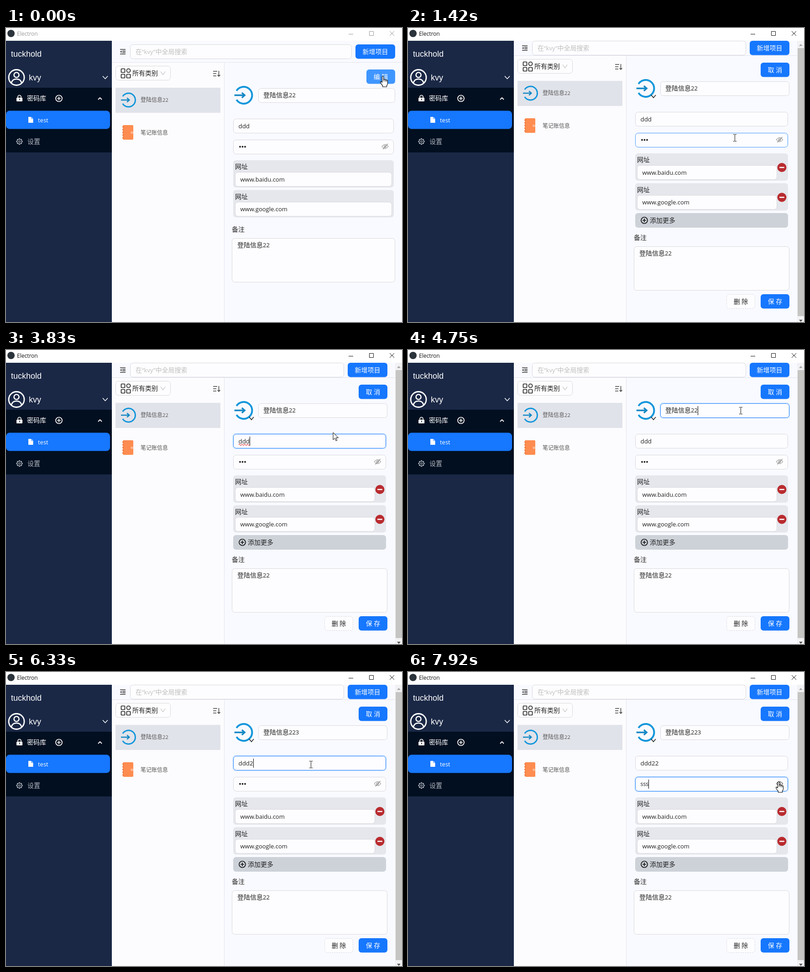
An HTML page for the animation above (8 s loop, 868 by 645 pixels).

```html
<!DOCTYPE html>
<html lang="zh">
<head>
<meta charset="utf-8">
<style>
html, body { margin: 0; width: 100%; height: 100%; overflow: hidden; background: #fff; }
svg { display: block; width: 868px; height: 645px; }
text { font-family: "Open Sans", "Noto Sans CJK SC", "Noto Sans CJK", sans-serif; white-space: pre; }
.ui { font-family: "Liberation Sans", Arial, sans-serif; }
</style>
</head>
<body>
<svg id="stage" viewBox="0 0 868 645"></svg>
<script>
const LOOP = 8000, STEP = 1000 / 12;
const BLUE = '#1677ff', HOVER = '#4096ff', INK = '#222';

// ---- timeline, in ms ----
const ACTIVE = 583, EDIT = 667, REVEAL = 7833;
const mouse = [[0, 826, 105], [167, 828, 101], [833, 828, 101], [1417, 716, 241], [1833, 711, 207],
  [3500, 711, 207], [4333, 729, 133], [5583, 729, 133], [6083, 668, 203], [6583, 668, 203],
  [7083, 672, 245], [7250, 672, 245], [7833, 812, 240]];
const focusKeys = [[0, ''], [2583, 'name'], [4583, 'title'], [6083, 'name'], [7083, 'pass']];
const titleKeys = [[0, '登陆信息22', 635], [5417, '登陆信息223', 643]];
const nameKeys = [[0, 'ddd', 534], [6333, 'ddd2', 542], [6500, 'ddd22', 550]];
const passKeys = [[0, '', 527], [REVEAL, 'sss', 527]];
const caretResets = [[2500], [4650], [5410], [6075], [6325], [6490], [7075], [7825]];

const at = (keys, t) => keys.filter(k => k[0] <= t + 1).pop() || keys[0];
const inside = (p, x, y, x2, y2) => p.x >= x && p.x <= x2 && p.y >= y && p.y <= y2;

function pointer(t) {
  const i = mouse.findIndex(k => k[0] > t + 1);
  const b = i < 0 ? mouse[mouse.length - 1] : mouse[i], a = mouse[i < 0 ? mouse.length - 1 : i - 1];
  const p = b[0] > a[0] ? (t - a[0]) / (b[0] - a[0]) : 0, e = p * p * (3 - 2 * p);
  return { x: Math.round(a[1] + (b[1] - a[1]) * e), y: Math.round(a[2] + (b[2] - a[2]) * e) };
}

// ---- drawing helpers ----
const rect = (x, y, x2, y2, fill, r = 0, more = '') =>
  `<rect x="${x}" y="${y}" width="${x2 - x}" height="${y2 - y}" rx="${r}" fill="${fill}" ${more}/>`;
const path = (d, stroke, w = 1, fill = 'none') =>
  `<path d="${d}" stroke="${stroke}" stroke-width="${w}" fill="${fill}"/>`;
const dot = (x, y, r, fill, stroke = 'none', w = 0) =>
  `<circle cx="${x}" cy="${y}" r="${r}" fill="${fill}" stroke="${stroke}" stroke-width="${w}"/>`;
const shift = (x, y, body) => `<g transform="translate(${x} ${y})">${body}</g>`;

// Latin runs sit a little smaller than the Chinese ones
function text(str, x, mid, fill = INK, size = 14, more = '') {
  const runs = str.replace(/[^\u2e80-\uffff]+/g, s => `<tspan font-size="${size * 13 / 14}">${s}</tspan>`);
  return `<text x="${x}" y="${mid + size * .34}" font-size="${size}" fill="${fill}" ${more}>${runs}</text>`;
}
const box = (x, y, x2, y2, stroke = '#d9d9de', more = '') =>
  rect(x + .5, y + .5, x2 - .5, y2 - .5, '#fdfdff', 6, `stroke="${stroke}" ${more}`);
const button = (label, x, y, x2, fill = BLUE) =>
  rect(x, y, x2, y + 31.5, fill, 6) + text(label, (x + x2) / 2, y + 16, '#fff', 14, 'text-anchor="middle"');
const chevron = (x, y, w, h, color, sw) => path(`M${x - w} ${y - h}L${x} ${y + h}L${x + w} ${y - h}`, color, sw);

// open ring with an arrow running into it
const loginIcon = (x, y, r, w) => shift(x, y,
  path(`M${-r * .85} ${-r * .53}A${r} ${r} 0 1 1 ${-r * .85} ${r * .53}`, '#1296db', w) +
  path(`M${-r * 1.1} 0H${r * .1}M${-r * .22} ${-r * .3}L${r * .12} 0L${-r * .22} ${r * .3}`, '#1488c4', w * .85));

const plusIcon = (x, y, color) => dot(x, y, 7, 'none', color, 1.7) +
  path(`M${x - 4} ${y}H${x + 4}M${x} ${y - 4}V${y + 4}`, color, 1.7);

function eyeIcon(x, y, open, color) {
  return shift(x, y, path('M-7 0Q0 -9 7 0Q0 9 -7 0Z', color, 1.1) + dot(0, 0, 2.3, 'none', color, 1.1) +
    (open ? '' : path('M-5 6L6 -6', color, 1.2)));
}

function titleBar(active) {
  const c = active ? '#111' : '#999';
  return rect(0, 0, 868, 28, '#fff') + dot(11, 12, 8, '#2b333b') +
    `<text x="24" y="17" font-size="12" fill="${c}">Electron</text>` +
    path('M751 13.5H761M796.5 7.5H805.5V16.5H796.5ZM841 7L851 17M851 7L841 17', c);
}

function sidebar() {
  const gear = Array.from({ length: 8 }, (_, i) =>
    `<path d="M0 -5V-7" transform="rotate(${i * 45})" stroke="#b4bac2" stroke-width="2.6"/>`).join('');
  return rect(0, 28, 232, 645, '#1a2846') + rect(0, 131, 232, 273, '#020f20') +
    '<text class="ui" x="11" y="63" font-size="18" fill="#fff">tuckhold</text>' +
    dot(23, 108.5, 17, 'none', '#fff', 2.8) + dot(23, 103, 5.5, 'none', '#fff', 2.6) +
    path('M12 120Q14 112 23 112T34 120', '#fff', 2.6) +
    '<text class="ui" x="50" y="115" font-size="18" fill="#fff">kvy</text>' +
    chevron(217.5, 108.5, 5.5, 3, '#fff', 1.5) +
    rect(23, 153, 36, 161, '#fff', 1) + path('M26 153V151A3.5 3.5 0 0 1 33 151V153', '#fff', 1.7) +
    rect(29, 155, 30.5, 158.5, '#020f20') +
    text('密码库', 46, 154.5, '#fff', 14, 'font-weight="500"') + plusIcon(116, 154.5, '#fff') +
    chevron(206, 155, 4, -2, '#fff', 1.8) +
    rect(0, 181.5, 228, 221.5, BLUE, 8) +
    path('M49 195H55.5L59.5 199V208H49Z', 'none', 0, '#fff') + path('M55.5 195V199H59.5', BLUE, .8) +
    text('test', 70, 202, '#fff') +
    shift(29.5, 249, gear + dot(0, 0, 5.2, 'none', '#b4bac2', 1.3) + dot(0, 0, 2, 'none', '#b4bac2', 1.2)) +
    text('设置', 47, 249, '#b4bac2');
}

function header(edit) {
  const y = edit ? 28 : 36, m = y + 16, x2 = edit ? 836 : 853, line = edit ? 60.5 : 75.5;
  return path(`M232 ${line}H${edit ? 853 : 868}`, '#e2e3ee') +
    path(`M250 ${m - 5}H262M255 ${m - 1.5}H262M255 ${m + 1.5}H262M250 ${m + 5}H262`, '#333', 1.3) +
    path(`M253.5 ${m - 2.5}V${m + 2.5}L250 ${m}Z`, 'none', 0, '#333') +
    box(272, y, x2 - 95, y + 32) + text('在“kvy”中全局搜索', 284, m, '#bfbfbf') +
    button('新增项目', x2 - 87, y, x2);
}

function list() {
  return box(240, 83, 361, 115) +
    [[252, 89, 1], [264, 89, 4], [252, 101, 1], [264, 101, 1]].map(([x, y, r]) =>
      rect(x + .5, y + .5, x + 8.5, y + 8.5, 'none', r, 'stroke="#222" stroke-width="1.7"')).join('') +
    text('所有类别', 277, 99, INK) + chevron(344, 99, 5, 3.5, '#bbb', 1.1) +
    path('M454 95H463M454 100H461M454 105H461M466.5 94V106M463.5 103L466.5 106L469.5 103', '#444', 1.5) +
    rect(240, 131, 470, 186, '#e1e3ea') + loginIcon(268.5, 158, 15, 3) +
    text('登陆信息22', 295, 158, '#555', 12) +
    rect(256, 213, 279, 245, '#ff8c50', 2) + path('M255 217H258M255 223H258M255 229H258M255 235H258M255 241H258', '#e5743c', 2) +
    rect(273, 227, 279, 232, '#ffb68f', 2) + text('笔记账信息', 295, 229.5, '#555', 12);
}

// An input that reacts to hover and focus
function field(id, s, x, y, x2, body, caretX) {
  const focused = s.focus === id, hover = s.edit && inside(s.p, x, y, x2, y + 32);
  const glow = focused ? Math.min(1, (s.t - s.focusAt + STEP) / 250) : 0;
  return (glow ? rect(x - 1, y - 1, x2 + 1, y + 33, 'none', 7, `stroke="#0591ff" stroke-width="2" opacity="${.12 * glow}"`) : '') +
    box(x, y, x2, y + 32, focused ? BLUE : hover ? HOVER : undefined) + body +
    (focused && s.caret ? rect(caretX, y + 6, caretX + 1, y + 26, '#000') : '');
}

function site(url, y, edit, right) {
  return rect(498, y, right, y + 60, '#e5e7ec', 6) + text('网址', 502, y + 14.5) +
    box(502, y + 26, edit ? 809 : 846, y + 58) + text(url, 513.5, y + 42) +
    (edit ? dot(819.5, y + 31, 10, '#b92b2f') + rect(814, y + 29.7, 825, y + 32.3, '#fff', 1) : '');
}

function detail(s) {
  const { edit, t } = s, dy = edit ? -15 : 0, R = edit ? 836 : 853, right = R - 3;
  const [, title, titleX] = at(titleKeys, t), [, name, nameX] = at(nameKeys, t), [, pass, passX] = at(passKeys, t);
  const by = 91 + dy, overButton = inside(s.p, R - 63, by, R, by + 32);
  const eyeX = R - 21.5, overEye = s.edit && inside(s.p, eyeX - 8, 237, eyeX + 8, 253);
  const wave = edit ? .2 * Math.pow(Math.max(0, 1 - (t - EDIT) / 1600), 5) : 0;
  const squiggle = t > 2580 && t < 4580
    ? path('M510 208' + 'q1.5 -3 3 0t3 0'.repeat(4), '#e03030', 1.1) : '';
  const dots = [513, 518.5, 524].map(x => dot(x, 260.5 + dy, 1.9, INK)).join('');
  const noteY = edit ? 479 : 461;
  return (wave > .002 ? rect(R - 66, by - 3, R + 3, by + 35, 'none', 9, `stroke="${BLUE}" stroke-width="6" opacity="${wave}"`) : '') +
    button(edit ? '取 消' : '编 辑', R - 63, by, R, overButton ? HOVER : BLUE) +
    loginIcon(521, 147.5 + dy, 18.5, 4) +
    (edit ? chevron(538, 150, 5, 3, '#222', 1.5) : '') +
    field('title', s, 553, 132 + dy, R, text(title, 564, 147.5 + dy), titleX) +
    field('name', s, 498, 199 + dy, right, text(name, 509.5, 215 + dy, INK, 14.4) + squiggle, nameX) +
    field('pass', s, 498, 245 + dy, right, (pass ? text(pass, 509.5, 260.5 + dy, INK, 13.4) : dots) +
      eyeIcon(eyeX + (edit ? 0 : -.5), 260 + dy, pass, overEye ? '#333' : '#8c8c8c'), passX) +
    site('www.baidu.com', 290 + dy, edit, right) + site('www.google.com', 355.5 + dy, edit, right) +
    (edit ? rect(498, 406, right, 438, '#cdd2d9', 6) + plusIcon(518, 422, '#111') + text('添加更多', 530, 422) : '') +
    text('备注', 495, noteY - 18.5) + box(495, noteY, R, noteY + 97) + text('登陆信息22', 507, noteY + 15.5) +
    (edit ? box(698, 584, 761, 616, '#d9d9de', 'stroke-dasharray="3 2"') +
      text('删 除', 729.5, 600, INK, 14, 'text-anchor="middle"') + button('保 存', 773, 584, 836) : '');
}

const scrollbar = () => rect(853, 28, 868, 645, '#f2f2f4') + rect(854, 44, 868, 632, '#c5c5c4') +
  path('M857 39.5H865L861 35Z', 'none', 0, '#a5a5a5') + path('M857 640H865L861 644.5Z', 'none', 0, '#505050');

function cursor({ p, edit }) {
  const R = edit ? 836 : 853, by = edit ? 76 : 91;
  const hand = inside(p, R - 63, by, R, by + 32) || edit && inside(p, 806, 237, 823, 253);
  const beam = edit && (inside(p, 553, 117, 836, 149) || inside(p, 498, 184, 833, 216) || inside(p, 498, 230, 833, 262));
  const shape = hand
    ? path('M-1.5 1.5Q0 -.5 1.8 1.5V8Q4 6.5 5 8.7Q7 7.5 8 9.5Q10.5 8.7 10.5 11V17Q10 20 8.5 21.5V24H-.5V21.5Q-4 18 -5.5 13.5Q-5 11 -1.5 14Z', '#000', 1.1, '#fff') +
      path('M1.8 8V12M5 9V12.5M8 10V13', '#000', 1)
    : beam
      ? path('M-3 -7.5H0M1 -7.5H4M.5 -7V7M-3 7.5H0M1 7.5H4', '#111')
      : path('M0 0V16L3.8 12.5L6.3 18.2L8.7 17.2L6.2 11.6H11.5Z', '#000', 1, '#fff');
  return shift(p.x, p.y, shape);
}

function scene(t) {
  const [focusAt, focus] = at(focusKeys, t);
  const s = { t, p: pointer(t), edit: t + 1 >= EDIT, focus, focusAt,
    caret: (t - at(caretResets, t)[0]) % 1000 < 500 };
  const top = s.edit ? 61 : 76;
  return rect(232, 28, 868, 645, '#f9faff') + rect(232, top, 478, 645, '#fcfcfe') +
    path(`M478.5 ${top}V645`, '#e2e3f0') +
    titleBar(t + 1 >= ACTIVE) + sidebar() + header(s.edit) +
    shift(0, s.edit ? -15 : 0, list()) + detail(s) + (s.edit ? scrollbar() : '') + cursor(s);
}

const stage = document.getElementById('stage');
let shown = -1;
function tick() {
  const step = Math.floor((performance.now() % LOOP + 5) / STEP) % 96;
  if (step !== shown) stage.innerHTML = scene((shown = step) * STEP);
  requestAnimationFrame(tick);
}
tick();
</script>
</body>
</html>
```
